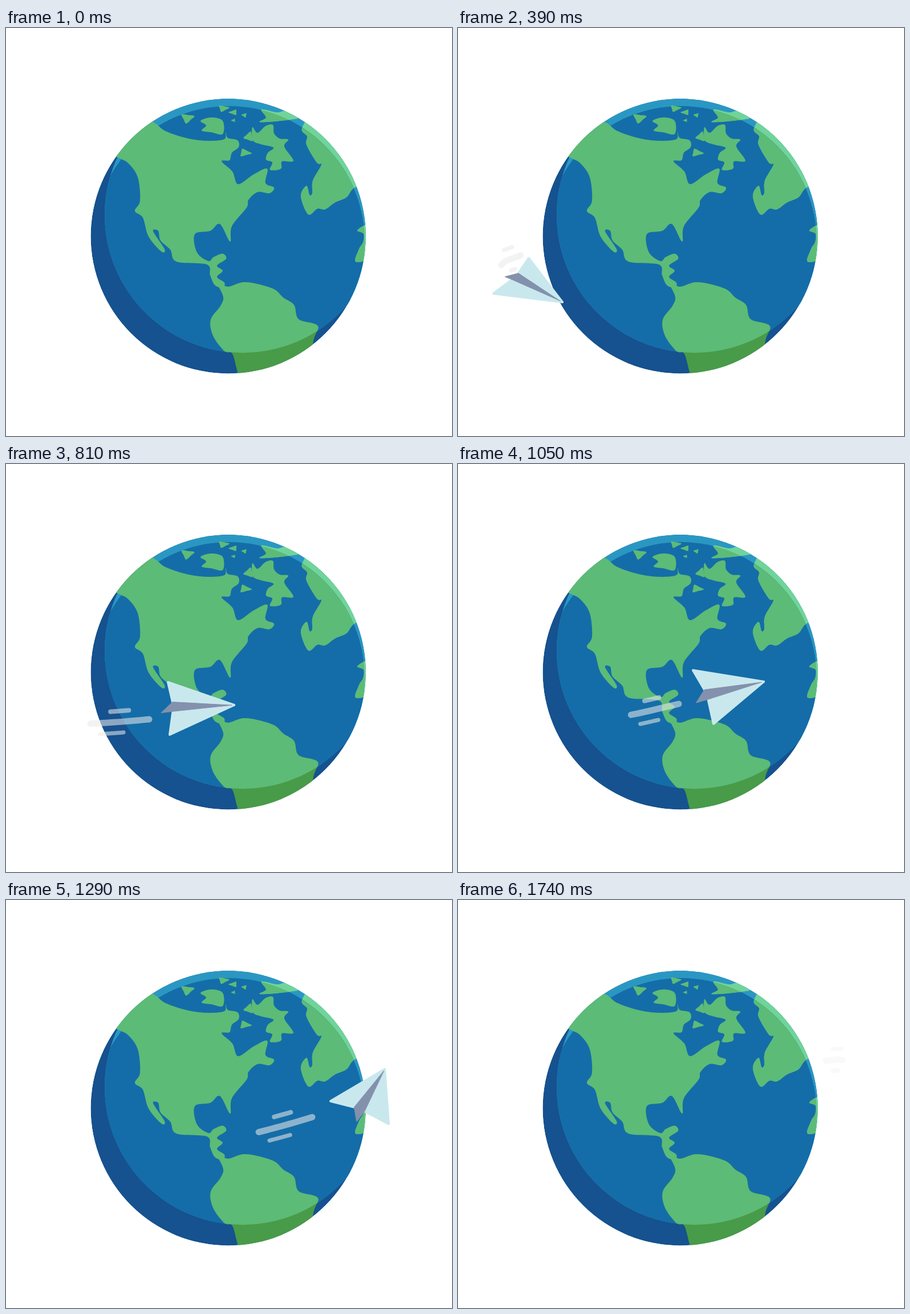
An HTML page with a canvas for the animation above (2.28 s loop, 782 px wide and 716 px high).

```html
<!DOCTYPE html>
<html lang="en">
<head>
<meta charset="utf-8">
<title>Paper plane around the globe</title>
<style>
html, body { margin: 0; width: 100%; height: 100%; overflow: hidden; background: #fff; }
canvas { display: block; }
</style>
</head>
<body>
<canvas id="stage" width="782" height="716"></canvas>
<script>
const ctx = document.getElementById('stage').getContext('2d');
const LOOP = 2280, STEP = 30, END = 1740;

const MID = '#5cbb76', LIGHT = '#70d49a', DARK = '#489b48';
const WING = '#c9e8ee', KEEL = '#8391ad';

const ramp = (t, from, to) => Math.min(Math.max((t - from) / (to - from), 0), 1);

// Closed smooth curve through a few points
function blob(p) {
  const n = p.length, path = new Path2D();
  path.moveTo(...p[0]);
  p.forEach((b, i) => {
    const a = p[(i + n - 1) % n], c = p[(i + 1) % n], d = p[(i + 2) % n];
    path.bezierCurveTo(b[0] + (c[0] - a[0]) / 6, b[1] + (c[1] - a[1]) / 6,
      c[0] - (d[0] - b[0]) / 6, c[1] - (d[1] - b[1]) / 6, ...c);
  });
  path.closePath();
  return path;
}

const coast = text => blob(text.trim().split(/\s+/).map(s => s.split(',').map(Number)));

// Small jagged island: a soft three-armed star
const islet = (x, y, w, h) => blob(Array.from({ length: 6 }, (_, k) => {
  const a = k * Math.PI / 3 + x, r = k % 2 ? .6 : 1.1;
  return [x + w * r * Math.cos(a), y + h * r * Math.sin(a)];
}));

function disc(x, y, r) {
  const path = new Path2D();
  path.arc(x, y, r, 0, 2 * Math.PI);
  return path;
}

const globe = disc(389.7, 365.3, 241.2);
const lit = disc(415, 328, 242);
const inner = disc(391, 375, 238);

const north = [
  coast(`180,215 196,227 214,237 231,262 235,303 226,321 240,333 250,366 272,392 278,388
    258,357 267,356 271,373 288,389 299,410 352,415 358,434 366,451 380,456 383,447
    370,437 380,426 370,417 386,405 380,396 364,402 355,409 335,394 331,362 358,356
    375,344 393,375 396,348 422,315 425,302 441,288 462,290 470,280 455,272 458,247
    434,257 407,274 397,252 378,234 392,232 396,219 408,209 406,197 389,193 385,183
    383,195 355,198 320,194 280,181 258,165 220,150`),
  coast(`432,174 441,184 455,172 468,170 470,185 480,194 495,196 488,208 504,233 484,234
    482,247 463,249 467,236 456,231 459,219 469,210 447,204 433,197`),
  coast('341,163 360,157 380,163 380,186 360,183 343,180 351,171'),
  islet(318, 158, 12, 9), islet(381, 141, 10, 6), islet(399, 148, 8, 5),
  islet(418, 153, 5, 4), islet(399, 162, 4, 3), islet(426, 191, 9, 9), islet(419, 219, 11, 7)
];

const south = coast(`372,449 381,472 376,488 359,512 363,540 383,567 397,572 407,606
  420,625 520,600 540,545 546,522 513,511 505,486 486,473 467,457 420,446 390,454`);

const east = [
  coast('448,143 475,148 490,146 515,157 480,163 445,165 456,157'),
  coast(`519,176 528,190 527,205 545,236 553,240 538,268 537,290 532,293 527,277 517,295
    530,327 546,317 560,318 577,306 597,297 611,280 645,265 600,170 545,145`),
  coast('636,345 616,355 627,361 626,376 619,388 613,410 640,402 645,365')
];

function within(path, draw) {
  ctx.save();
  ctx.clip(path);
  draw();
  ctx.restore();
}

function fill(color, ...paths) {
  ctx.fillStyle = color;
  paths.forEach(p => ctx.fill(p));
}

function drawGlobe() {
  within(globe, () => {
    fill('#15528f', globe);
    within(lit, () => {
      fill('#2a97c3', globe);
      fill('#146da8', inner);
    });
    fill(DARK, south);
    within(lit, () => fill(MID, south));
    fill(LIGHT, ...east);
    within(inner, () => fill(MID, ...east));
    within(east[1], () => {
      ctx.strokeStyle = 'rgba(30,120,130,.4)';
      ctx.lineWidth = .7;
      ctx.stroke(inner);
    });
    fill(MID, ...north);
  });
}

// Smooth interpolation of rows [time, ...values]
function at(keys, t) {
  const last = keys.length - 1;
  t = Math.min(Math.max(t, keys[0][0]), keys[last][0]);
  let i = 0;
  while (i < last - 1 && t > keys[i + 1][0]) i++;
  const a = keys[Math.max(i - 1, 0)], b = keys[i], c = keys[i + 1], d = keys[Math.min(i + 2, last)];
  const h = c[0] - b[0], u = (t - b[0]) / h, v = 1 - u;
  return b.slice(1).map((p, j) => {
    const k = j + 1;
    const m = (c[k] - a[k]) / (c[0] - a[0]) * h;
    const n = (d[k] - b[k]) / (d[0] - b[0]) * h;
    return p * (1 + 2 * u) * v * v + m * u * v * v + c[k] * u * u * (3 - 2 * u) - n * u * u * v;
  });
}

// time, nose, left wing tip, right wing tip
const poses = [
  [30, 140, 370, 195, 395, 190, 335],
  [150, 66, 408, 160, 395, 115, 326],
  [270, 98, 472, 104, 372, 26, 402],
  [390, 183, 481, 124, 404, 62, 466],
  [810, 400, 423, 284, 383, 287, 475],
  [1050, 536, 382, 412, 362, 448, 456],
  [1290, 664, 297, 569, 353, 671, 393],
  [1400, 690, 240, 671, 346, 762, 318],
  [1500, 622, 250, 665, 318, 722, 256],
  [1680, 515, 240, 545, 270, 585, 235]
];

function poly(color, width, ...points) {
  ctx.beginPath();
  points.forEach(p => ctx.lineTo(...p));
  ctx.closePath();
  ctx.fillStyle = ctx.strokeStyle = color;
  ctx.lineWidth = width;
  ctx.lineJoin = 'round';
  ctx.fill();
  ctx.stroke();
}

function drawPlane(t) {
  const [nx, ny, lx, ly, rx, ry] = at(poses, t);
  const mx = (lx + rx) / 2, my = (ly + ry) / 2;
  // Point given along the axis (tail 0, nose 1) and across the wings
  const spot = (along, across) =>
    [mx + (nx - mx) * along + (lx - rx) * across, my + (ny - my) * along + (ly - ry) * across];
  const nose = [nx, ny], notchL = spot(.06, .12), notchR = spot(.06, -.06);
  const [kx, ky] = spot(-.12, 0);
  poly(WING, 4, nose, [lx, ly], notchL);
  poly(WING, 4, nose, [rx, ry], notchR);
  poly(KEEL, 1, spot(.96, 0), notchL, [kx, ky + 7], notchR);
}

const route = [
  [100, 190, 368], [240, 110, 399], [390, 76, 416], [520, 65, 453], [810, 251, 448],
  [1050, 387, 421], [1290, 537, 381], [1500, 664, 334], [1600, 698, 300],
  [1680, 674, 281], [1740, 645, 282]
];

function drawTrail(t) {
  const lag = 149 - 89 * ramp(t, 1500, 1600);
  const alpha = .56 - .26 * ramp(t, 1600, END);
  const line = (from, to, side, width) => {
    ctx.beginPath();
    for (let i = 0; i <= 16; i++) {
      const s = t - lag + lag * (from + (to - from) * i / 16);
      const [x, y] = at(route, s), [x0, y0] = at(route, s - 2), [x1, y1] = at(route, s + 2);
      const len = Math.hypot(x1 - x0, y1 - y0) || 1;
      ctx.lineTo(x + (y1 - y0) / len * side, y - (x1 - x0) / len * side);
    }
    ctx.strokeStyle = `rgba(234,234,234,${alpha})`;
    ctx.lineWidth = width;
    ctx.lineCap = ctx.lineJoin = 'round';
    ctx.stroke();
  };
  line(0, 1, 0, 11);
  line(.34, .65, 19, 8);
  line(.15, .53, -19, 7);
}

function frame() {
  const now = performance.now() % LOOP;
  const t = Math.min(Math.floor(now / STEP) * STEP, END);
  const trailBehind = t < 480 || t > 1640;
  const planeBehind = t < 240 || t > 1450;
  const planeShown = t >= STEP && t < 1680;
  ctx.clearRect(0, 0, 782, 716);
  if (t && trailBehind) drawTrail(t);
  if (planeShown && planeBehind) drawPlane(t);
  drawGlobe();
  if (!trailBehind) drawTrail(t);
  if (planeShown && !planeBehind) drawPlane(t);
  requestAnimationFrame(frame);
}
frame();
</script>
</body>
</html>
```
